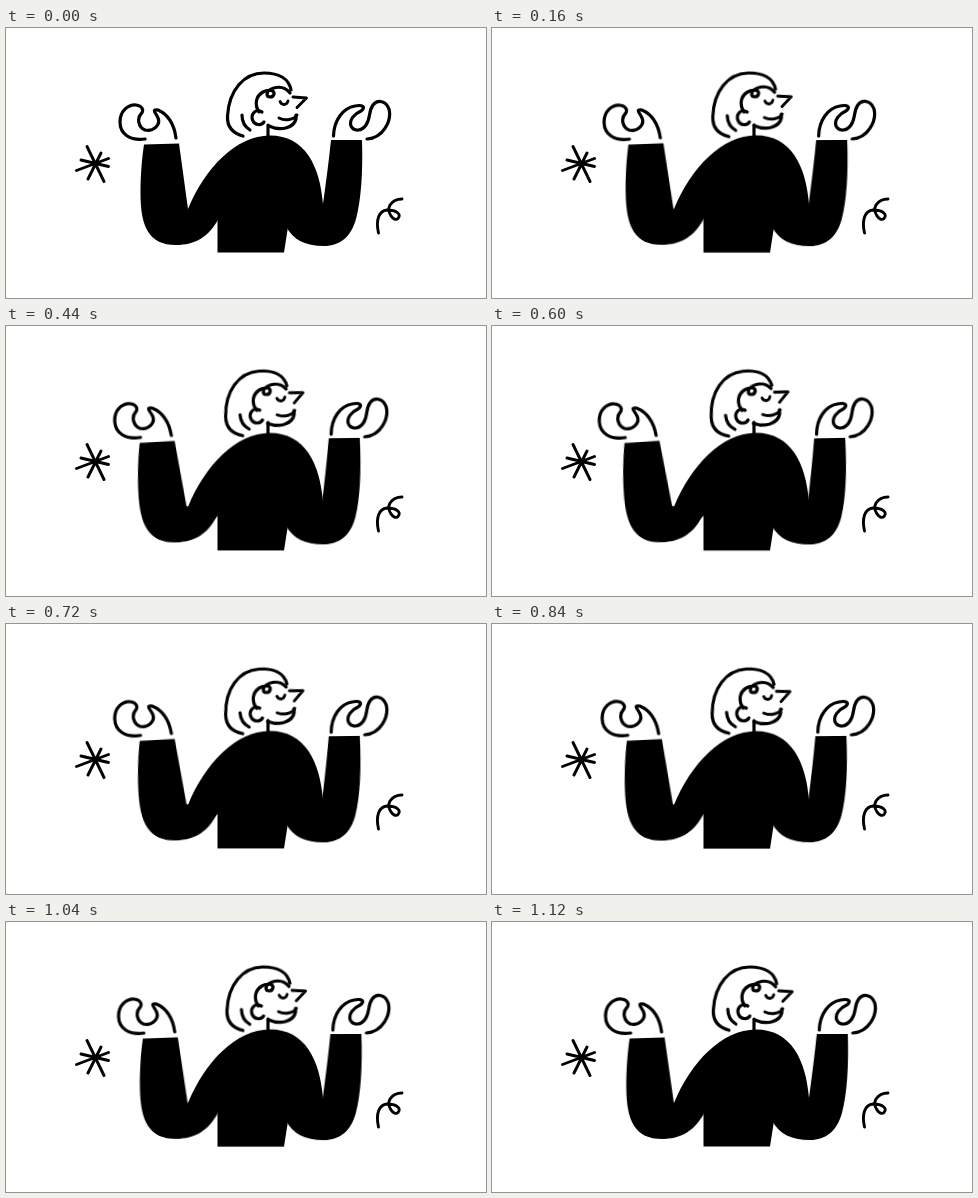
These frames come from a looping animation (480x270 px, 1.16 s). An HTML page without scripts:

```html
<!DOCTYPE html>
<html lang="en">
<head>
<meta charset="utf-8">
<title>Shrug</title>
<style>
  html, body { margin: 0; width: 100%; height: 100%; overflow: hidden; background: #fff; }
  svg { display: block; width: 100%; height: 100%; }
  .line { fill: none; stroke: #000; stroke-width: 3.2; stroke-linecap: round; stroke-linejoin: round; }
  .thin { stroke-width: 2.9; }
  .sway { animation: 580ms linear infinite alternate; }
  .head { transform-origin: 262px 108px; animation-name: head; }
  .left { transform-origin: 150px 215px; animation-name: left; }
  .right { transform-origin: 345px 217px; animation-name: right; }
  .body { transform-origin: 245px 224.5px; animation-name: body; }
  @keyframes head { to { transform: translate(-.5px, -.5px) rotate(-6deg); } }
  @keyframes left { to { transform: rotate(-2.2deg) skewX(1.1deg); } }
  @keyframes right { to { transform: rotate(-1deg) skewX(.6deg); } }
  @keyframes body { to { transform: scaleY(1.006); } }
</style>
</head>
<body>
<svg viewBox="0 0 480 270">
  <g class="sway body">
    <path class="line" d="M262 97V109"/>
    <path d="M182 181C199 140 230 107.500 264 107.500C299 107.500 314 138 317 176L306 208L282 199L278 224.500H211.500V190L186 209Z"/>
  </g>

  <g class="sway left">
    <path d="M138 116.500L173 115.500L182 181L213 190C203 209 189 217 170 217C143 217 134.500 199 134.500 165C134.500 147 136 130 138 116.500Z"/>
    <path class="line" d="M139 111C124 113 114 106 114 94C114 83 122 76.500 130 77C137 78 138 83 135 86C131 90 132 99 139 102C147 104 155 97 152 90C150 85 145 81 152 82C161 86 168 95 170 110"/>
  </g>

  <g class="sway right">
    <path d="M325 112H356C357 145 355 172 350 191C345 209 334 218 318 218C299 218 287 212 280 198L317 176C320 154 323 132 325 112Z"/>
    <path class="line" d="M327.500 108C328 92 337 80 349 78C357 76.500 360 79 355 83C348 86 343 92 345 98C348 104 356 103 360 97C365 90 362 84 367 77C372 71 380 73 383 81C386 93 377 110 361 111"/>
  </g>

  <g class="sway head line">
    <path d="M237 108C226 105 221 98 221.500 88C223 62 238 45 258 45C273 45 283 51 285 62"/>
    <path d="M236 87C236 93 239 99 244 102"/>
    <path d="M253 84C248 76 250 68 257 64C262 61 269 62 268 66C267 70 261 70 261 66C262 60 276 55 284 65"/>
    <path d="M256 84C249 80 244 87 247 93C249 97 255 98 258 94"/>
    <path class="thin" d="M274 73.500C276 78 281 77 282 73"/>
    <path class="thin" d="M287 69L300.500 70L291 79.500"/>
    <path class="thin" d="M273 90C279 93 288 92 291 87"/>
    <path d="M290 87V91C288 99 276 104 263 98"/>
  </g>

  <path class="line thin" d="M81 118.500L98 153.500M95 125L82 151M70.500 142.500L102.500 130.500M75 132L102.500 138.500"/>
  <path class="line thin" d="M372.500 205C369.500 192 373 182.500 381 182C390 182 396 186 392 190.500C388 194.500 380 184 384 177C387 172.500 391 171 396 171"/>
</svg>
</body>
</html>
```
